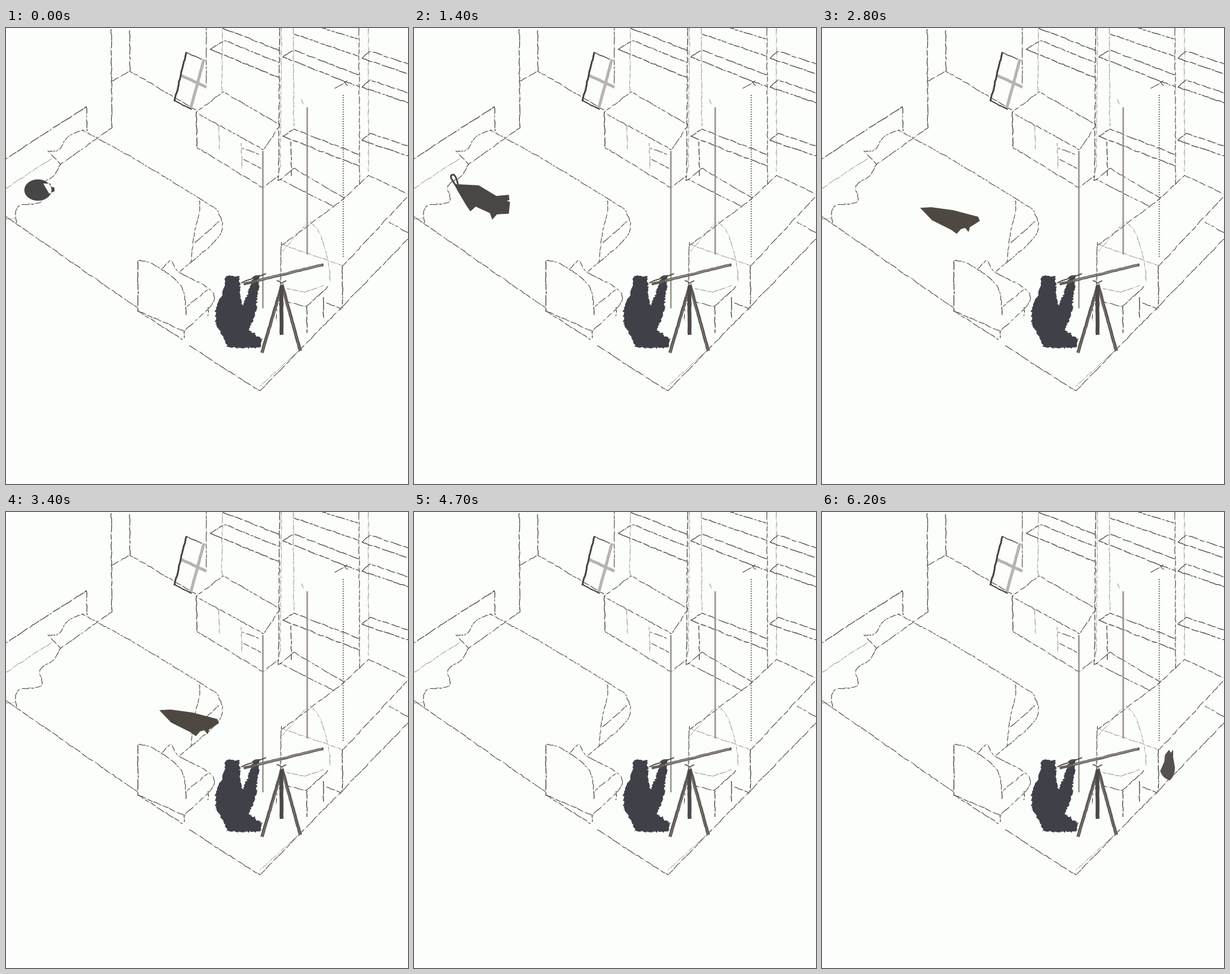
Recreate the animation shown at these times as an HTML page. Size 680 by 771 pixels, loop 7.2 s.

```html
<!DOCTYPE html>
<html lang="en">
<head>
<meta charset="utf-8">
<title>Cat in a room</title>
<style>
html, body { margin: 0; width: 100%; height: 100%; overflow: hidden; background: #fcfefb; }
svg { display: block; width: 100%; height: 100%; }
</style>
</head>
<body>
<svg viewBox="0 0 680 771" fill="none" stroke-linejoin="round">
  <g id="room"></g>
  <g id="cat"><path id="body"/><path id="tail" stroke-width="3"/></g>
  <g id="front"></g>
</svg>
<script>
const NS = 'http://www.w3.org/2000/svg';
const LOOP = 7200;
const $ = id => document.getElementById(id);
const room = $('room'), front = $('front'), cat = $('cat');

let seed = 41;
function rnd() {
  seed = (seed * 16807) % 2147483647;
  return seed / 2147483647;
}
const jitter = amp => (rnd() * 2 - 1) * amp;

function add(parent, d, attrs) {
  const p = document.createElementNS(NS, 'path');
  p.setAttribute('d', d);
  for (const k in attrs) p.setAttribute(k, attrs[k]);
  parent.append(p);
}

const points = text => text.trim().split(/\s+/).map(s => s.split(',').map(Number));

// Extra points on a Catmull-Rom curve through the given ones.
function smooth(pts) {
  const out = [pts[0]];
  for (let i = 1; i < pts.length; i++) {
    const b = pts[i - 1], c = pts[i], a = pts[i - 2] || b, e = pts[i + 1] || c;
    for (let u = 0.25; u <= 1; u += 0.25) {
      out.push([0, 1].map(j => b[j] + u / 2 * (c[j] - a[j] +
        u * (2 * a[j] - 5 * b[j] + 4 * c[j] - e[j] + u * (3 * b[j] - a[j] - 3 * c[j] + e[j])))));
    }
  }
  return out;
}

// Path along the points with a hand-drawn wobble.
function wobble(pts, step, amp) {
  let d = `M${pts[0]}`;
  for (let i = 1; i < pts.length; i++) {
    const [ax, ay] = pts[i - 1], [bx, by] = pts[i];
    const n = Math.ceil(Math.hypot(bx - ax, by - ay) / step);
    for (let k = 1; k <= n; k++) {
      const x = ax + (bx - ax) * k / n + jitter(amp);
      const y = ay + (by - ay) * k / n + jitter(amp);
      d += `L${x.toFixed(1)},${y.toFixed(1)}`;
    }
  }
  return d;
}

// Pencil: a pale line under broken darker marks.
function pencil(pts, weight) {
  const d = wobble(pts, 5, 0.7);
  const dash = Array.from({ length: 10 }, (_, i) => i % 2 ? 1 + rnd() * 5 / weight : 2 + rnd() * 15 * weight);
  add(room, d, { stroke: '#c6c2bb', 'stroke-width': 0.9 });
  add(room, d, {
    stroke: weight < 1 ? '#8f8a82' : '#504b44',
    'stroke-width': 0.5 + weight * 0.6,
    'stroke-dasharray': dash.map(v => v.toFixed(1)).join(' ')
  });
}
const lines = (text, weight = 1) => text.split('/').forEach(s => pencil(points(s), weight));
const curve = (text, weight = 1) => pencil(smooth(points(text)), weight);

// Walls and floor
lines('178,2 179,169 / 209,4 210,73', 1.3);
lines('179,90 210,73 322,139 / 225,479 299,527 / 310,537 429,614 680,357');
lines('429,606 504,538', 0.6);

// Bed
lines('0,221 136,133 137,174', 1.3);
lines('0,271 78,220 / 0,323 16,322', 0.6);
lines('71,208 92,231 179,169 / 319,363 361,327 / 0,319 222,473');
curve('131,172 104,184 90,206 71,208');
curve('92,231 80,251 57,267 60,294 20,302 18,332');
curve('129,173 210,217 330,290 359,312 361,352 292,413');
curve('327,292 327,312 318,350 313,396');

// Armchair
lines('223,394 223,479 / 301,512 301,524 / 342,472 342,487', 1.5);
curve('224,393 250,400 296,436 305,485');
curve('264,407 280,393 291,412 345,442 348,468 302,512');
lines('305,484 304,473 340,443 / 222,478 300,512');

// Cabinet
lines('322,143 323,203', 1.5);
lines('321,143 367,108 464,164 436,206 321,143 / 323,202 434,270 461,250 / 400,203 428,214 / 402,222 432,237');
lines('360,165 361,206 / 398,194 399,238', 0.6);

// Bookcase uprights and shelves
lines('339,0 339,95 / 597,0 598,265');
lines('366,2 365,108 / 486,0 487,165 / 613,0 613,242 / 466,0 464,240', 0.6);
lines('463,0 461,258 / 482,192 483,250', 1.4);

function shelves(x0, x1, depth, rise, slope, levels) {
  for (const y of levels) {
    const xb = x0 + depth, yb = y - rise;
    pencil([[x0, y], [x1, y + (x1 - x0) * slope]], 1.4);
    pencil([[x0, y], [xb, yb], [x1, yb + (x1 - xb) * slope]], 1.2);
  }
}
shelves(345, 462, 25, 15, 0.41, [36]);
shelves(468, 597, 19, 12, 0.39, [49, 183]);
shelves(602, 680, 14, 12, 0.34, [51, 100, 190]);
lines('366,0 462,38 / 487,10 597,48 / 535,0 595,18', 1.3);
lines('461,258 487,237 573,288 / 464,256 555,302 / 556,102 577,89 / 569,88 578,98');

// Desk, cloth and stool
lines('466,368 570,290 613,249 680,281 / 570,402 680,284 / 648,328 680,346 / 466,362 463,470 / 542,465 568,475');
lines('569,402 569,473 / 509,471 509,516 / 537,455 537,491', 1.5);
lines('473,462 508,471 545,437 / 458,455 457,495');
lines('467,378 511,328 / 466,366 570,402 / 500,121 503,130', 0.6);
curve('514,327 532,350 546,400 548,430', 0.6);
curve('475,440 505,446 536,435', 0.6);

function bar(parent, text, stroke, width, amp = 0.3) {
  add(parent, wobble(points(text), 6, amp), { stroke, 'stroke-width': width });
}

// Picture frame
bar(room, '335,53 312,137', '#b7b4ad', 5);
bar(room, '296,80 339,100', '#b7b4ad', 5);
bar(room, '305,41 285,124', '#45433f', 3, 0.6);
bar(room, '304,41 331,53', '#45433f', 1.5, 0.6);
bar(room, '284,122 314,138', '#45433f', 2, 0.6);

// Cords
bar(front, '434.5,208 434.5,474', '#99948e', 2.6, 0);
bar(front, '509.5,134 509.5,383', '#99948e', 2.6, 0);
add(front, 'M570.5 113V388', { stroke: '#78736c', 'stroke-width': 2, 'stroke-dasharray': 2 });

// Seated figure with a ragged edge
const figure = '372,420 395,419 396,455 400,468 407,455 419,419 429,419 422,485 410,509 ' +
  '433,527 429,541 375,540 355,500 354,478 367,445 372,420';
add(front, wobble(points(figure), 2, 1.7) + 'Z', { fill: '#404148' });

// Telescope and tripod
bar(front, '398,431 440,415', '#55514c', 2, 0.6);
bar(front, '402,433 537,400', '#625d56', 4.6);
bar(front, '425,427 534,400.5', '#98938b', 1.6, 0);
for (const foot of ['433,549', '498,546']) {
  bar(front, `467,434 ${foot}`, '#5d5852', 5.5);
  bar(front, `467,440 ${foot}`, '#88827a', 1);
}
bar(front, '466,436 466,519', '#4b494a', 6.5);
bar(front, '458,427 466,432 474,427', '#68635c', 2, 1);
bar(front, '463,415 465,424', '#77726b', 1.5, 0.5);

// Cat outlines, drawn from the top left corner of each pose
const shapes = {
  curl: {
    color: '#474545',
    body: 'M0 18a23 18 0 1 0 46 0a23 18 0 1 0 -46 0M32 7h12l1 5l6 2v6l-9 4Z'
  },
  stretch: {
    color: '#49464a',
    body: 'M0 1L26 9L64 18L75 22L76 30L70 34L78 47L57 44L54 40L20 34L19 23Z'
  },
  walk: {
    color: '#4a4646',
    body: 'M10 17L49 19L79 37L100 35L101 44L96 45L102 47L100 67L80 68L72 77L68 66L44 55L35 63L28 53L12 26Z',
    tail: 'M13 24L3 8Q0 1 6 1Q10 1 14 17'
  },
  prowl: {
    color: '#4f4842',
    body: 'M0 2L19 1L56 6L98 17L101 24L84 35L82 43L76 36L69 38L62 46L52 39L20 23Z'
  },
  leap: {
    color: '#4c463f',
    body: 'M0 20L33 7Q60 0 98 4L113 12L122 15L99 31L96 42L89 35L63 35L48 34L35 42L33 31Z'
  },
  sit: {
    color: '#55524e',
    body: 'M16 1L19 6L23 1V13L26 31Q26 46 17 53Q4 48 1 37L8 21L9 10Z'
  }
};

// The cat glides from one key place to the next: time, shape, left, top.
const keys = [
  [0, 'curl', 31, 256],
  [200, 'curl', 31, 253],
  [400, 'sit', 45, 220],
  [600, 'stretch', 24, 246],
  [800, 'stretch', 34, 245],
  [1000, 'walk', 30, 239],
  [2000, 'walk', 106, 259],
  [2800, 'prowl', 166, 302],
  [3900, 'leap', 337, 359],
  [4200, 'leap', 388, 343],
  [4700, '', 474, 388],
  [5200, 'leap', 457, 372],
  [5400, 'sit', 566, 385],
  [6200, 'sit', 571, 401],
  [LOOP, 'sit', 571, 401]
];

function draw(t) {
  const hold = t >= 3200 && t < 4800 ? 100 : 200;
  const now = Math.max(Math.floor(t / hold) * hold, t >= 4700 && t < 5200 ? 4700 : 0);
  const i = keys.findIndex(k => k[0] > now);
  const [t0, name, x0, y0] = keys[i - 1], [t1, , x1, y1] = keys[i];
  cat.style.display = name ? '' : 'none';
  if (!name) return;
  const u = (now - t0) / (t1 - t0);
  const { color, body, tail = '' } = shapes[name];
  cat.setAttribute('transform', `translate(${x0 + (x1 - x0) * u} ${y0 + (y1 - y0) * u})`);
  $('body').setAttribute('d', body);
  $('body').setAttribute('fill', color);
  $('tail').setAttribute('d', tail);
  $('tail').setAttribute('stroke', color);
}

const began = performance.now();
function tick() {
  draw((performance.now() - began) % LOOP);
  requestAnimationFrame(tick);
}
tick();
</script>
</body>
</html>
```
